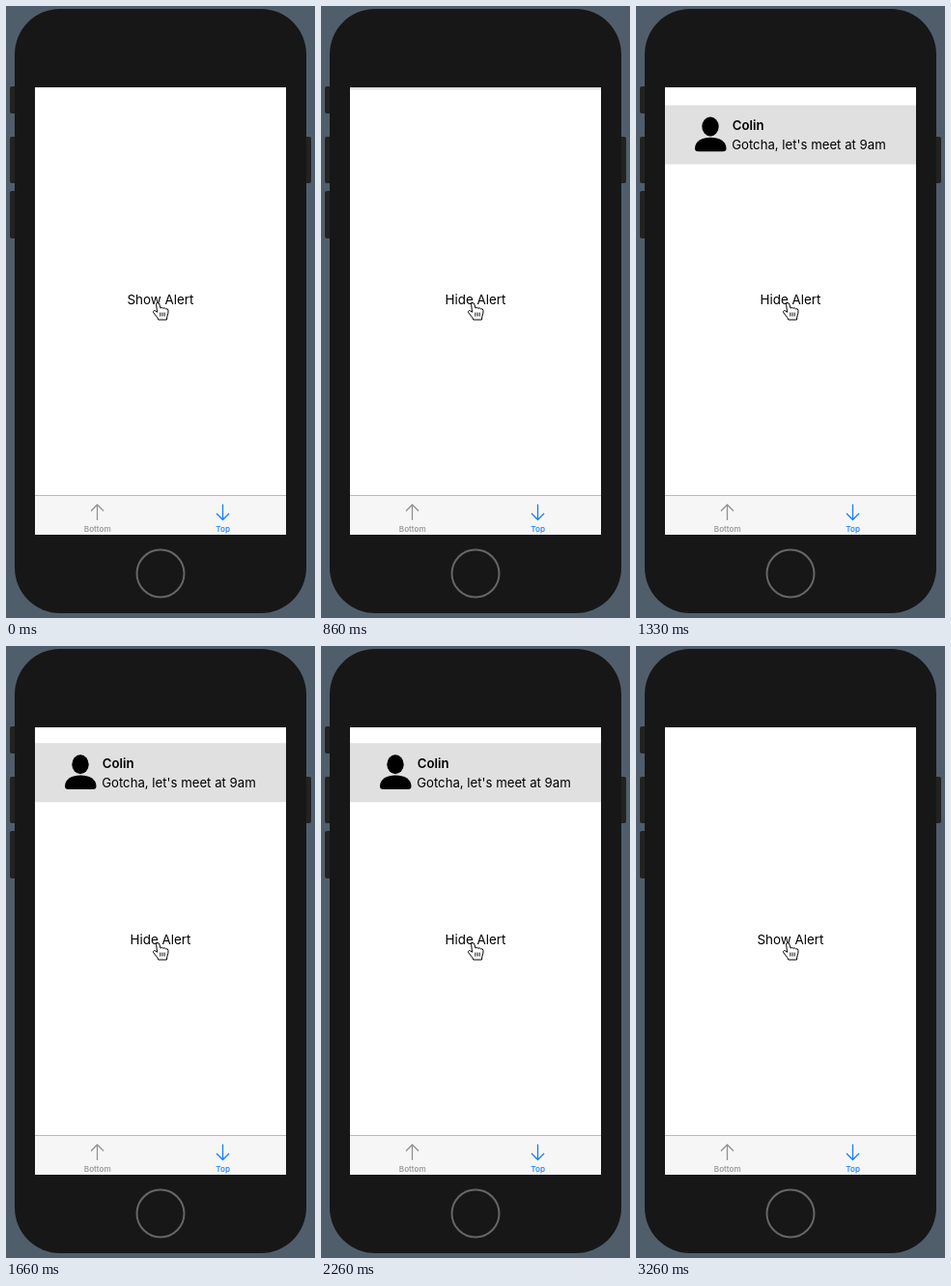
Write an HTML page that moves like this. It is 320x632 px and loops after 3330 ms.

```html
<!DOCTYPE html>
<html lang="en">
<head>
<meta charset="utf-8">
<title>Alert banner</title>
<style>
html, body { margin: 0; width: 100%; height: 100%; overflow: hidden; background: #505e6c; }
svg { display: block; width: 100%; height: 100%; font-family: Inter, "Liberation Sans", sans-serif; }
.tab { font-size: 8.2px; font-weight: 500; text-anchor: middle; }
.icon { fill: none; stroke-width: 1.3; }
</style>
</head>
<body>
<svg viewBox="0 0 320 632">
  <defs><clipPath id="screen"><rect x="30" y="84" width="260" height="462"/></clipPath></defs>

  <!-- phone -->
  <g fill="#222">
    <rect x="4" y="83" width="8" height="28" rx="2"/>
    <rect x="4" y="135" width="8" height="48" rx="2"/>
    <rect x="4" y="191" width="8" height="49" rx="2"/>
    <rect x="308" y="135" width="8" height="48" rx="2"/>
  </g>
  <rect x="9" y="3" width="302" height="624" rx="47" fill="#171717"/>
  <circle cx="160" cy="586" r="24.5" fill="none" stroke="#666" stroke-width="2"/>
  <rect x="30" y="84" width="260" height="462" fill="#fff"/>

  <!-- alert -->
  <g clip-path="url(#screen)">
    <g id="banner">
      <rect x="30" width="260" height="61" fill="#e0e0e0"/>
      <ellipse cx="77" cy="22" rx="8.7" ry="10"/>
      <path d="M61 44.5C61 37 68.5 33.2 77.2 33.2S93.5 37 93.5 44.5Q93.5 47.8 90 47.8H64.5Q61 47.8 61 44.5Z"/>
      <text x="99.8" y="25.3" font-size="13.2" font-weight="600">Colin</text>
      <text x="99.2" y="45.3" font-size="13.2">Gotcha, let's meet at 9am</text>
    </g>
  </g>

  <text id="button" x="160" y="308" font-size="13.4" text-anchor="middle">Show Alert</text>

  <!-- tab bar -->
  <rect x="30" y="505" width="260" height="41" fill="#f6f6f6"/>
  <rect x="30" y="505" width="260" height="1" fill="#bababa"/>
  <path class="icon" stroke="#929292" d="M94.5 531V515M88 521.5L94.5 515L101 521.5"/>
  <text class="tab" x="94.8" y="542.5" fill="#929292">Bottom</text>
  <path class="icon" stroke="#147efb" d="M224.5 514.5V530.5M218 524L224.5 530.5L231 524"/>
  <text class="tab" x="224.6" y="542.5" fill="#147efb">Top</text>

  <!-- pointer -->
  <path fill="#fff" stroke="#000" stroke-linejoin="round" d="M155.6 308.6Q155.4 306.6 157 306.5Q158.3 306.5 158.8 308L160 312Q161.6 310.8 162.9 312.2Q164.4 311.2 165.5 312.8Q167.8 312.2 168 314.4Q168.2 317.5 167 320L166.4 324H157.8L156.8 321.8L152.8 316.8Q152 315 153.4 314.6Q154.6 314.4 156.6 316.2Z"/>
  <path stroke="#000" stroke-width=".9" d="M159.8 316.5V320.5M162 316.5V320.5M164.2 316.5V320.5"/>
</svg>
<script>
const LOOP = 3330, SHOW = 830, HIDE = 2330;
const HIDDEN = 22, SHOWN = 100.3;
const banner = document.getElementById("banner");
const button = document.getElementById("button");

// Damped spring response from 0 to 1, t in seconds.
function spring(t) {
  if (t <= 0) return 0;
  const speed = 10.4, damping = 0.74;
  const root = Math.sqrt(1 - damping * damping), phase = speed * root * t;
  return 1 - Math.exp(-damping * speed * t) * (Math.cos(phase) + damping / root * Math.sin(phase));
}

function draw(now) {
  const t = now % LOOP;
  const shown = spring((t - SHOW) / 1000) - spring((t - HIDE) / 1000);
  banner.setAttribute("transform", `translate(0 ${HIDDEN + (SHOWN - HIDDEN) * shown})`);
  button.textContent = t >= SHOW && t < HIDE ? "Hide Alert" : "Show Alert";
}

const start = performance.now();
function tick() {
  draw(performance.now() - start);
  requestAnimationFrame(tick);
}
tick();
</script>
</body>
</html>
```
